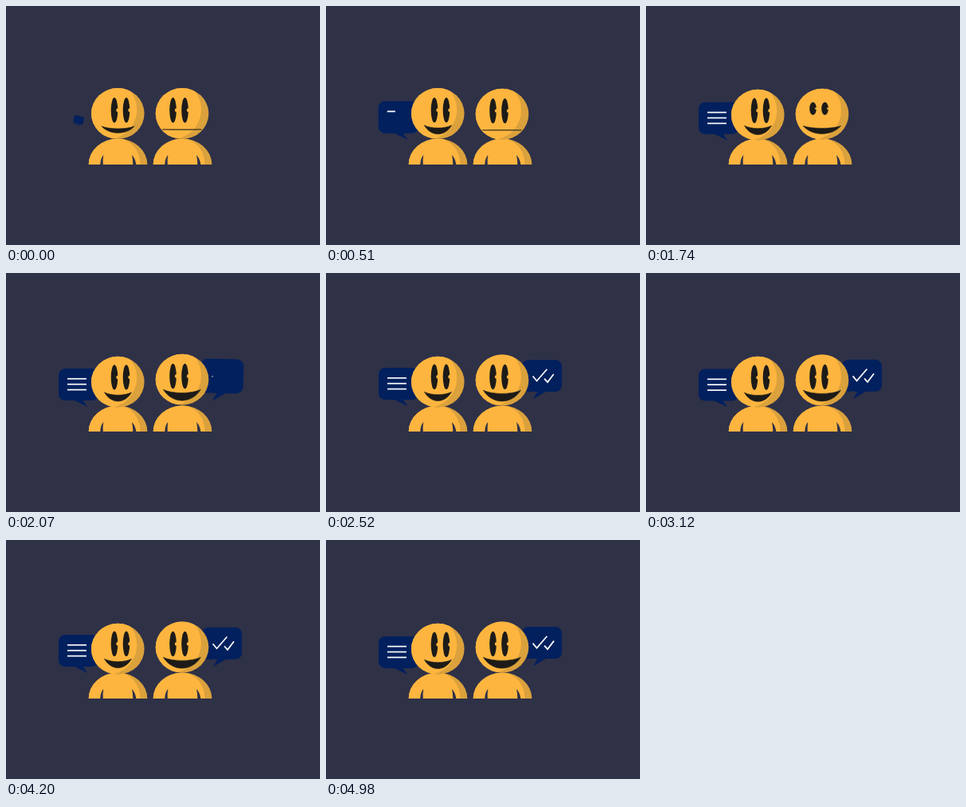
An HTML page that plays this animation: 394 by 300 pixels, repeating every 5.01 s.

```html
<!DOCTYPE html>
<html lang="en">
<head>
<meta charset="utf-8">
<title>Two friends chatting</title>
<style>
  html, body { margin: 0; width: 100%; height: 100%; overflow: hidden; background: #2f3147; }
  svg { display: block; width: 100vw; height: 100vh; }
  .skin { fill: #fdb53f; }
  .shade { fill: #daa13c; }
  .ink { fill: #1c1b19; }
  .mouth { stroke: #1c1b19; stroke-width: 0.6; }
  .gap { fill: #2f3147; }
  .bubble { fill: #02205e; }
  .line { fill: none; stroke: #fff; stroke-width: 1.7; }
</style>
</head>
<body>
<svg viewBox="0 0 394 300">
  <defs>
    <clipPath id="headClip"><ellipse cx="140.3" cy="135" rx="33.3" ry="32"/></clipPath>
    <g id="body">
      <path class="shade" d="M103.7 199A36.8 32.5 0 0 1 177.300 199Z"/>
      <path class="skin" d="M103.7 199A36.8 32.5 0 0 1 140.5 166.5A28 32.5 0 0 1 168.500 199Z"/>
      <path class="gap" d="M122.3 187Q118.5 191 118.2 199.3H121.8Q121.3 192 122.3 187Z"/>
      <path class="gap" d="M158 187Q162.5 192 163.3 199.3H159.3Q159.300 193 158 187Z"/>
    </g>
    <g id="head">
      <ellipse class="shade" cx="140.3" cy="135" rx="33.3" ry="32"/>
      <circle class="skin" cx="127" cy="130" r="37.3" clip-path="url(#headClip)"/>
    </g>
    <g id="eye">
      <ellipse class="ink" cy="130.8" rx="4.3" ry="15.7"/>
      <ellipse class="skin" cx="4" cy="130.8" rx="1.700" ry="2.200"/>
    </g>
    <rect id="card" class="bubble" width="50" height="40" rx="8"/>
  </defs>

  <g id="bubbleL">
    <use href="#card" x="66" y="120"/>
    <path class="bubble" d="M84 159L102.500 168L96 159Z"/>
    <g id="lines">
      <path class="line" pathLength="1" d="M77 132.700H101"/>
      <path class="line" pathLength="1" d="M77 139.600H101"/>
      <path class="line" pathLength="1" d="M77 146.500H101"/>
    </g>
  </g>
  <g id="bubbleR">
    <use href="#card" x="246" y="109.300"/>
    <path class="bubble" d="M278 148L260 158.500L266 148Z"/>
    <g id="ticks">
      <path class="line" pathLength="1" d="M259.500 129.800L264.500 135.800L277.300 121"/>
      <path class="line" pathLength="1" d="M274 132.800L278 137.300L286 126.800"/>
    </g>
  </g>

  <use href="#body"/>
  <use href="#body" x="81"/>

  <g id="headL">
    <use href="#head"/>
  </g>
  <g id="faceL">
    <g><use href="#eye" x="136"/><use href="#eye" x="151"/></g>
    <path class="ink mouth" id="mouthL"/>
  </g>
  <g id="headR">
    <use href="#head" x="80.700"/>
    <g id="eyesR"><use href="#eye" x="209.500"/><use href="#eye" x="224.500"/></g>
    <path class="ink mouth" id="mouthR"/>
  </g>
</svg>
<script>
const LOOP = 5010, STEP = 30;
const $ = id => document.getElementById(id);
const clamp = p => Math.min(1, Math.max(0, p));
const mix = (a, b, p) => a + (b - a) * p;
const progress = (t, from, to) => clamp((t - from) / (to - from));
const ramp = (t, from, to) => {
  const p = progress(t, from, to);
  return p * p * (3 - 2 * p);
};
const hump = (t, from, to) => Math.sin(Math.PI * progress(t, from, to));
const wave = (t, period, peak = 0) => Math.cos(2 * Math.PI * (t - peak) / period);
const move = (id, value) => $(id).setAttribute('transform', value);

// Grows with a slight overshoot.
function pop(t, start, time) {
  const q = progress(t, start, start + time) - 1;
  return 1 + 2.5 * q ** 3 + 1.5 * q ** 2;
}

const faces = {
  L: { cx: 140.5, rest: { half: 20.5, corner: 151, top: 154, bottom: 159.3 },
       smile: { half: 17, corner: 149.8, top: 153.2, bottom: 161 } },
  R: { cx: 220.8, rest: { half: 24.5, corner: 155, top: 155, bottom: 155.2 },
       smile: { half: 23.5, corner: 147.6, top: 151.8, bottom: 161.4 } }
};

function drawMouth(side, joy) {
  const { cx, rest, smile } = faces[side];
  const at = key => mix(rest[key], smile[key], joy);
  const half = at('half'), y = at('corner');
  const bend = key => y + (at(key) - y) / 0.75;
  const l = cx - half, r = cx + half, a = cx - half / 2, b = cx + half / 2;
  const up = bend('top'), low = bend('bottom');
  $('mouth' + side).setAttribute('d',
    `M${l} ${y}C${a} ${up} ${b} ${up} ${r} ${y}C${b} ${low} ${a} ${low} ${l} ${y}Z`);
}

function drawBubble(id, size, tilt, cx, cy, dy) {
  $(id).style.display = size > 0.01 ? '' : 'none';
  move(id, `translate(${cx} ${cy + dy}) rotate(${tilt * (1 - size)}) ` +
           `scale(${size}) translate(${-cx} ${-cy})`);
}

function reveal(id, t, start, gap, time) {
  [...$(id).children].forEach((line, i) => {
    const from = start + i * gap;
    const p = ramp(t, from, from + time);
    line.style.display = p > 0 ? '' : 'none';
    line.setAttribute('stroke-dasharray', p < 1 ? `${p} 2` : 'none');
  });
}

function draw(t) {
  const bob = wave(t, LOOP / 3) * ramp(t, 0, 500);
  move('headL', `translate(0 ${1.8 * ramp(t, 1050, 1650)})`);
  move('faceL', `translate(0 ${0.5 * bob})`);
  drawMouth('L', ramp(t, 0, 600));

  const sink = 1.7 * ramp(t, 0, 1050);
  const rise = 2.1 * ramp(t, 1560, 1950) + hump(t, 1800, 2200);
  move('headR', `translate(0 ${sink - rise})`);
  const open = 1 - 0.9 * hump(t, 1560, 1780);
  move('eyesR', `translate(0 125) scale(1 ${open}) translate(0 -125)`);
  drawMouth('R', ramp(t, 1350, 1950));

  drawBubble('bubbleL', pop(t, -36, 600), 18, 91, 144, 0.9 * bob);
  drawBubble('bubbleR', pop(t, 1740, 500), -18, 271, 133, 0.5 * wave(t, LOOP / 2, 4200));
  reveal('lines', t, 390, 120, 270);
  reveal('ticks', t, 2040, 210, 300);
}

const start = performance.now();
function frame(now) {
  const t = Math.max(0, now - start) % LOOP;
  draw(Math.floor(t / STEP) * STEP);
  requestAnimationFrame(frame);
}
draw(0);
requestAnimationFrame(frame);
</script>
</body>
</html>
```
